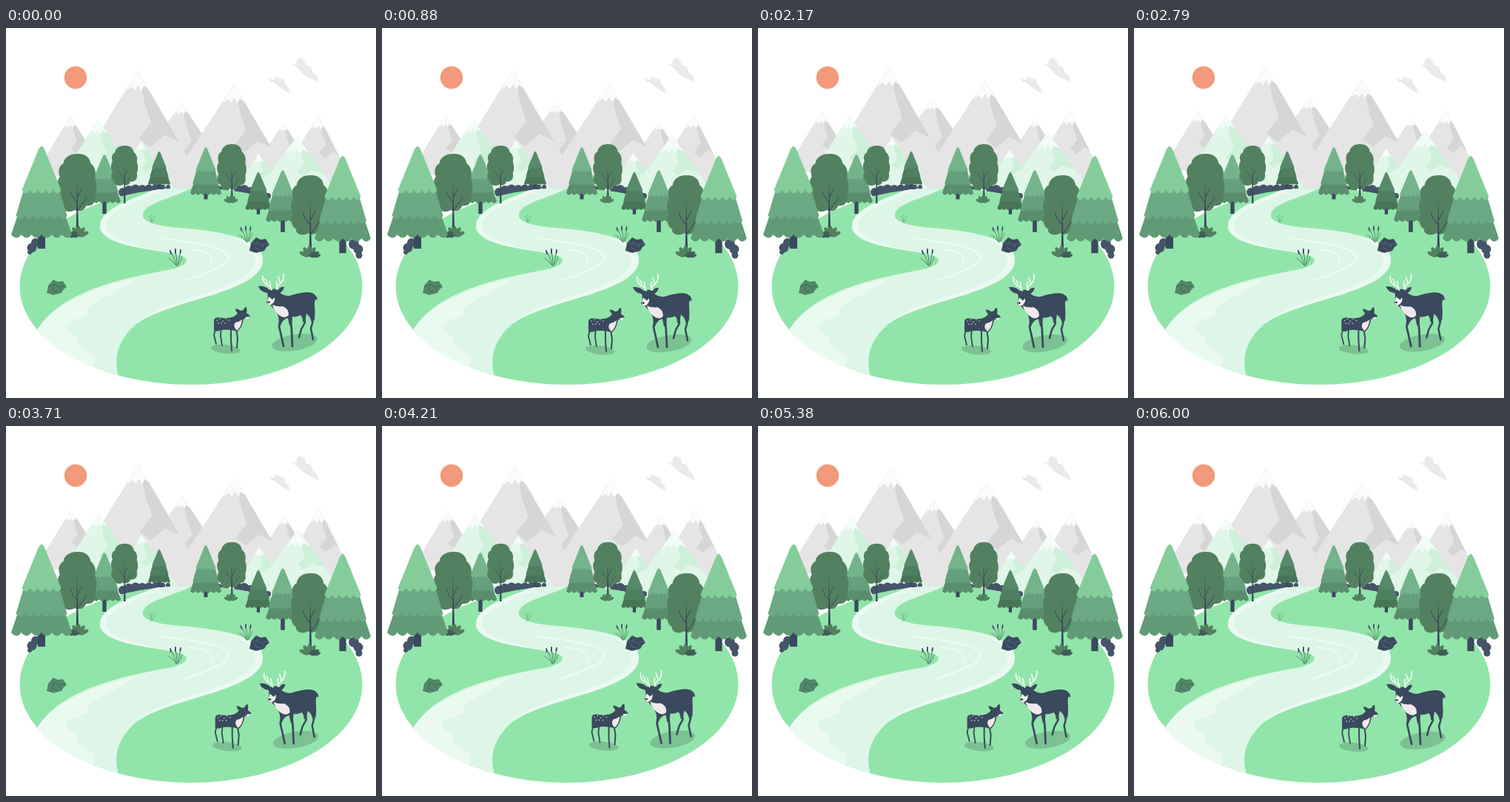
Write an HTML page that moves like this. It is 500 by 500 pixels and loops after 6040 ms.

```html
<!DOCTYPE html>
<html lang="en">
<head>
<meta charset="utf-8">
<title>Deer by the river</title>
<style>
html,body{margin:0;width:100%;height:100%;overflow:hidden;background:#fff}
svg{display:block;width:100vw;height:100vh}
</style>
</head>
<body>
<svg id="stage" viewBox="0 0 500 500"></svg>
<script>
const LOOP = 6040;
const NAVY = '#3a495d';

const path = (d, fill, extra = '') => `<path d="${d}" fill="${fill}" ${extra}/>`;
const line = (d, color, width, extra = '') =>
  path(d, 'none', `stroke="${color}" stroke-width="${width}" stroke-linecap="round" stroke-linejoin="round" ${extra}`);
const disc = (x, y, rx, ry, fill, extra = '') =>
  `<ellipse cx="${x}" cy="${y}" rx="${rx}" ry="${ry}" fill="${fill}" ${extra}/>`;
const group = (transform, body, id = '') => `<g id="${id}" transform="${transform}">${body}</g>`;

const GREY = ['#e5e5e5', '#d6d6d6', '#fbfbfb'];
const MINT = ['#e0f6e8', '#cdf0d8', '#f4fcf7'];

// Peak at (x, y); left and right are the horizontal run per unit of height.
function mountain(x, y, base, left, right, cap, [light, shade, snow]) {
  const h = base - y;
  const body = `M0 0L${h * right} ${h}H${-h * left}Z`;
  const dark = `M0 0L${h * right * .58} ${h * .58}L${h * .22} ${h * .52}L${h * .1} ${h * .62}
    L${h * .01} ${h * .55}L${h * .11} ${h * .42}L${h * .06} ${h * .27}Z`;
  const top = `M0 0L${cap * right} ${cap}L${cap * .34} ${cap * .8}L${cap * .2} ${cap * 1.08}
    L${cap * .02} ${cap * .76}L${-cap * .16} ${cap * 1.05}L${-cap * .32} ${cap * .85}L${-cap * left} ${cap * 1.06}Z`;
  return group(`translate(${x} ${y})`, path(body, light) + path(dark, shade) + path(top, snow));
}

function tier(topY, topW, bottomY, bottomW, count, fill) {
  const step = 2 * bottomW / count;
  const hem = `q${-step * .45} 9 ${-step} 0`.repeat(count);
  return path(`M${-topW} ${topY}Q0 ${topY - topW * 2.2} ${topW} ${topY}L${bottomW} ${bottomY}${hem}Z`, fill);
}

function pine(x, y, height, half, trunk, [top, mid, low]) {
  const tree = `<rect x="-5" y="118" width="10" height="${trunk}" fill="${NAVY}"/>`
    + tier(90, 31, 119, 41, 6, low)
    + tier(56, 23, 94, 34.5, 6, mid)
    + tier(7, 4.5, 60, 26.5, 5, top);
  return group(`translate(${x} ${y}) scale(${half / 41} ${height / 124})`, tree);
}

const CROWN = `M0 0C11-1 18 5 19 13C25 17 27 25 25 32C28 39 28 48 25 54C28 64 22 72 13 70C9 78 3 79-3 76
  C-12 81-21 77-20 70C-27 68-28 57-24 51C-28 45-28 36-24 31C-27 23-25 16-19 13C-18 4-9 0 0 0Z`;

function leafy(x, y, sx, sy, foot) {
  return group(`translate(${x} ${y}) scale(${sx} ${sy})`,
    path(CROWN, '#53815f')
    + path(`M0 34L2.4 ${foot}H-1.4Z`, NAVY)
    + line('M1 76Q8 69 13 59M1 66Q-6 60-10 50M1 58L7 47', NAVY, 1));
}

function shrub(x, y, size, fill) {
  const leaves = [-65, -32, 0, 32, 65].map(a =>
    disc(0, -7, 2.7, 6.5, fill, `transform="rotate(${a})"`)).join('');
  return group(`translate(${x} ${y}) scale(${size})`, leaves);
}

const bushes = list => list.map(([x, y, r]) => disc(x, y, r, r, '#445469')).join('');

function reeds(x, y, size) {
  return group(`translate(${x} ${y}) scale(${size})`,
    line('M0 0Q-2-10-7-18M1 0Q1-10-1-20M2 0Q4-9 6-19M0 0Q-5-7-10-10M2 0Q6-5 8-12', '#55896a', 1)
    + line('M-8-20l1 4M-1-22v5M6-21l-.7 4', NAVY, 1.8));
}

function rock(x, y, fill, crack) {
  return group(`translate(${x} ${y})`,
    path('M-13 8L-11-2L-4-10L2-7L9-8L14 0L10 3L7 8L-4 11Z', fill)
    + line('M-10 0L-3-4L3 0L12-2M-3-4L-5 5L3 7M3 0L7 5', crack, .9));
}

const clouds =
  path('M387 49C389 48 391 50 393 50C391 43 396 39 400 42C405 43 404 48 406 51C411 50 414 54 414 60C419 62 421 67 423 74C414 70 406 65 399 60C398 55 392 55 387 49Z', '#eaeaea')
  + path('M355 69C358 68 360 70 362 71C362 66 367 65 370 68C374 67 377 71 377 76C381 78 383 83 384 88C377 85 371 81 366 77C363 73 358 74 355 69Z', '#eaeaea');

const hills =
  mountain(87, 119, 200, .61, .62, 15, GREY)
  + mountain(375, 128, 212, .65, .62, 11, GREY)
  + mountain(422, 117, 212, .6, .5, 19, GREY)
  + mountain(237, 101, 224, .7, .66, 15, GREY)
  + mountain(178, 58, 224, .62, .58, 25, GREY)
  + mountain(308, 76, 224, .65, .59, 24, GREY)
  + mountain(124, 124, 230, .62, .7, 18, MINT)
  + mountain(182, 153, 222, .6, .7, 12, MINT)
  + mountain(341, 170, 224, .62, .7, 12, MINT)
  + mountain(393, 146, 234, .72, .72, 23, MINT);

const RIVER = `M212 214C180 229 127 242 127 268C128 293 190 298 222 304C250 308 252 319 224 326
  C160 338 70 355 40 412L80 490H160C142 456 146 426 176 400C222 366 347 358 347 313
  C347 283 285 274 235 270C188 267 174 256 193 241C210 231 235 226 255 214Z`;

const land =
  disc(250, 349, 231.5, 133, '#92e5aa')
  + `<g clip-path="url(#meadow)">`
  + path(RIVER, '#ddf6e7')
  + path('M212 214C180 229 127 242 127 268C128 293 190 298 222 304C170 293 134 284 135 266C138 244 190 231 224 214Z', '#ebfaf1')
  + path('M300 281C325 287 347 295 347 313C347 358 222 366 176 400C210 364 332 354 337 316C338 298 320 288 300 281Z', '#ebfaf1')
  + path('M40 412C60 374 119 352 176 338C150 359 104 374 110 384C116 391 88 392 82 401C77 412 100 414 96 422C90 430 112 434 119 444C124 454 110 458 128 470L100 490Z', '#ebfaf1')
  + line('M205 283C245 290 286 292 300 306C308 319 270 332 243 341M250 299C273 302 283 309 276 318', '#eefbf4', 2)
  + line('M197 432C188 448 196 463 210 472M240 432Q285 443 323 465M262 470Q296 461 321 462', '#7dca95', .6, 'stroke-dasharray="1 3"')
  + '</g>';

const LIGHT = ['#84cd9b', '#6ba982', '#609b76'];
const MIDDLE = ['#73b48b', '#659f7b', '#598d6c'];
const DARK = ['#568a69', '#4e7f60', '#477457'];

const plants =
  pine(207, 166, 46, 15, 18, DARK)
  + pine(270, 160, 66, 21, 16, MIDDLE)
  + pine(341, 194, 52, 17.5, 20, DARK)
  + pine(133, 170, 67, 22, 32, MIDDLE)
  + pine(374, 191, 71, 23, 30, MIDDLE)
  + leafy(160, 159, .67, .69, 113)
  + leafy(305, 157, .73, .79, 94)
  + shrub(304, 236, .75, '#53815f')
  + leafy(96, 170, .97, 1, 107)
  + leafy(411, 199, .96, 1.03, 102)
  + shrub(98, 282, 1.1, '#53815f')
  + shrub(91, 283, .65, '#3e5c58')
  + shrub(410, 309, 1.1, '#53815f')
  + shrub(417, 310, .65, '#3e5c58')
  + bushes([[35, 297, 6.5], [40, 290, 6], [32, 303, 3], [470, 292, 7], [476, 299, 6.5], [477, 307, 4.5]])
  + pine(48, 158, 126, 41, 20, LIGHT)
  + pine(455, 171, 118, 38, 22, LIGHT)
  + reeds(230, 321, 1)
  + reeds(325, 289, .95)
  + group('translate(197 263)', line('M0 0Q-2-6-4-9M0 0V-11M0 0Q3-5 5-9', '#6bb184', .9))
  + rock(68, 350, '#548769', '#3f6b55')
  + rock(342, 293, NAVY, '#566780');

const leg = (d, width) => line(d, NAVY, width);
const BONE = '#f0f9f2';
const SHADOW = '#7bc191';

const stag =
  disc(390, 425, 31, 11, SHADOW, 'transform="rotate(-10 390 425)"')
  + leg('M412 380L414.5 397L412 406L415 421', 2.5)
  + leg('M402 384L404 398L399 407L396 418', 2.5)
  + leg('M373 390L369 403L372 416L375 430', 2.7)
  + leg('M384 386L386 408L387 430', 2.8)
  + path('M357 374Q365 367 368 356Q374 362 383 362Q398 357 409 357Q420 358 421 368Q417 364 417 373Q418 384 417 394L413 398Q411 389 406 386L404 398L401 397Q401 391 398 388Q392 391 387 390L386 401L383 402L381 392Q374 393 371 402L368 402Q371 389 362 380Z', NAVY)
  + path('M360 374Q366 377 374 376Q382 379 382 388Q377 394 369 388Q362 383 360 374Z', '#f0e9ea')
  + path('M353 358Q344 357 341 349Q350 348 356 354Q363 351 368 354Q371 349 376 350Q374 357 368 359Q366 369 360 373Q354 376 352 371Q355 364 353 358Z', NAVY)
  + path('M355 363L360 367L363 364Q364 371 358 374Q352 375 353 369Z', '#f4f0f0')
  + disc(355, 370.5, 1.8, 1.4, NAVY)
  + line('M359 354Q358 349 351 346Q346 342 347 335M353 347Q353 341 350 339M358 351Q357 345 356 342M366 353Q366 348 371 345Q376 341 375 332M371 345Q369 340 368 336M366 350Q365 345 366 342', BONE, 1.7);

const spots = [[285, 395], [289, 393], [293, 396], [297, 393], [301, 395], [287, 399], [291, 399], [296, 399]];
const fawn =
  disc(297, 434, 20, 6, SHADOW, 'transform="rotate(6 297 434)"')
  + leg('M284 402L281 415L284 427', 1.8)
  + leg('M291 404L290 416L292 429', 1.8)
  + leg('M304 406L304 421L305 436', 2)
  + leg('M311 406L313 419L312 432', 2)
  + path('M281 398Q280 391 287 391Q296 393 305 391Q311 389 313 385Q310 383 310 379Q315 380 317 382L321 381Q322 377 325 377Q326 382 325 385L329 388Q331 391 327 392L321 393Q319 405 313 410Q302 407 292 408Q285 411 281 409Z', NAVY)
  + path('M319 394Q318 404 312 409Q306 403 310 398Q315 397 319 394Z', '#f0e9ea')
  + path('M323 391L329 390Q329 393 324 393Z', '#f4f0f0')
  + spots.map(([x, y]) => disc(x, y, .75, .75, '#f4f0f0')).join('');

document.getElementById('stage').innerHTML =
  '<defs><clipPath id="meadow"><ellipse cx="250" cy="349" rx="231.5" ry="133"/></clipPath></defs>'
  + '<rect width="500" height="500" fill="#fff"/>'
  + disc(94, 67, 15.2, 15.2, '#f29a7b')
  + clouds
  + group('', hills, 'hills')
  + bushes([[158, 222, 6], [166, 220, 7], [175, 218, 6.5], [184, 218, 6], [193, 217, 5.5], [202, 216, 5], [211, 216, 4.5], [219, 215, 3],
    [288, 218, 4.5], [296, 219, 5], [314, 218, 6], [322, 218, 6], [330, 220, 5], [354, 227, 4]])
  + land + plants
  + group('', fawn + stag, 'herd');

const hillGroup = document.getElementById('hills');
const herdGroup = document.getElementById('herd');
const move = (node, x, y) => node.setAttribute('transform', `translate(${x.toFixed(3)} ${y.toFixed(3)})`);

function render(now) {
  const phase = now % LOOP / LOOP * 2 * Math.PI;
  const sway = Math.sin(phase);
  move(hillGroup, -1.6 * sway, -3.5 * (1 - Math.cos(phase)));
  move(herdGroup, -2.6 * sway, 1.5 * sway);
}

const start = performance.now();
function tick() {
  render(performance.now() - start);
  requestAnimationFrame(tick);
}
tick();
</script>
</body>
</html>
```
